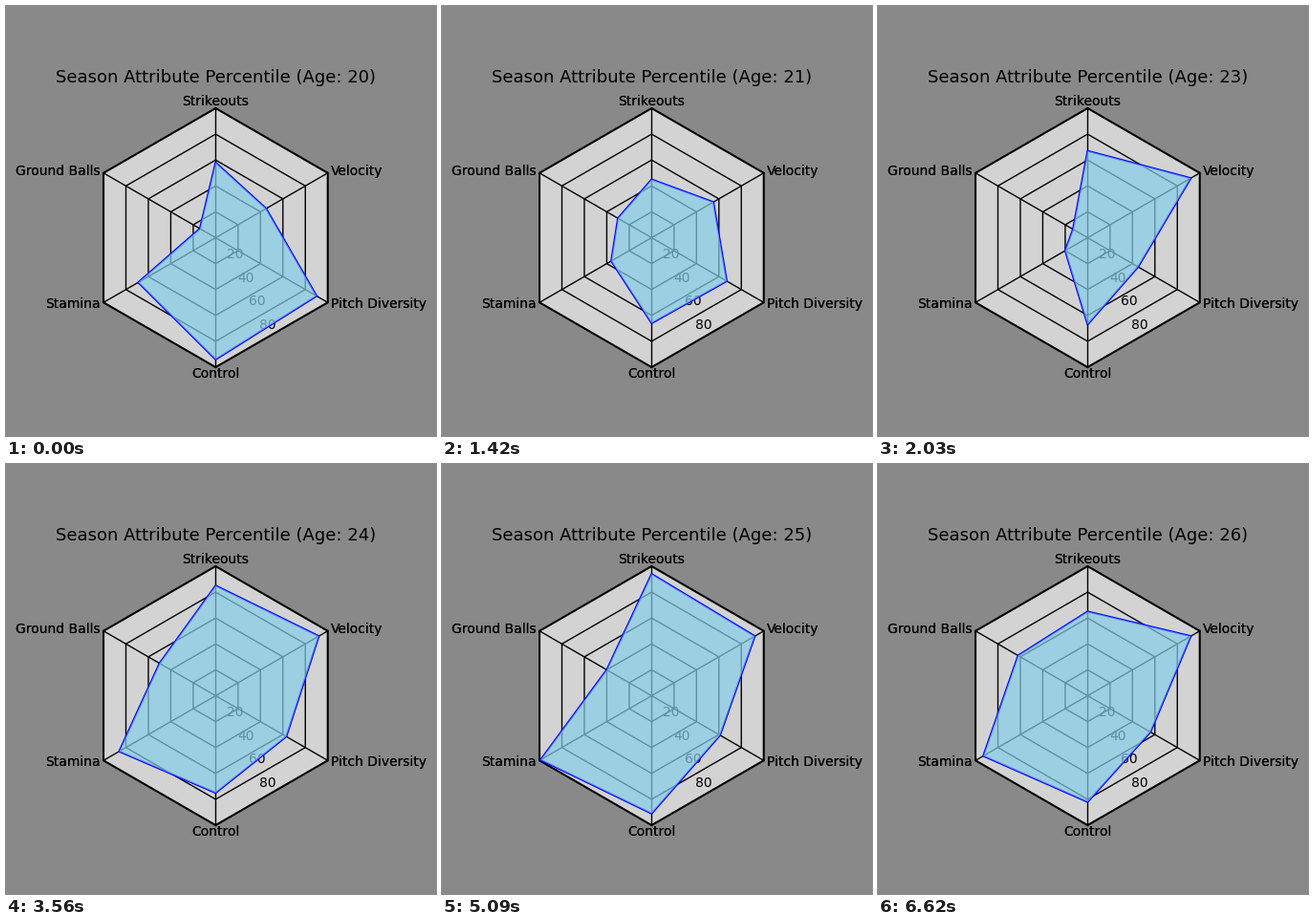
Recreate the animation shown at these times as a matplotlib script. Size 450 by 450 pixels, loop 8000 ms.

```python
import numpy as np
import matplotlib.pyplot as plt
from matplotlib.animation import FuncAnimation

SIZE, DPI = 450, 100
CX, CY, R = 219.375, 242.5, 135.5
LOOP, STEP = 8000, 20
FIRST, HOLD = 500, 1530  # ms: length of the first season, then of each other

AGES = [20, 21, 23, 24, 25, 26]
# percentile per season, clockwise from the top
SCORES = {
    "Strikeouts": [58, 45, 67, 85, 94, 65],
    "Velocity": [45, 55, 92, 92, 92, 92],
    "Pitch Diversity": [90, 67, 45, 63, 61, 56],
    "Control": [94, 66, 67, 75, 91, 82],
    "Stamina": [69, 36, 20, 86, 99, 93],
    "Ground Balls": [14, 30, 13, 50, 40, 62],
}
ANGLES = np.radians(np.arange(0, 360, 60))


def polar(value, angle):
    """Stage position of a percentile; angle is clockwise from the top."""
    r = np.asarray(value) * R / 100
    return np.column_stack([CX + r * np.sin(angle), CY - r * np.cos(angle)])


plt.rcParams["font.family"] = "DejaVu Sans"
fig = plt.figure(figsize=(SIZE / DPI, SIZE / DPI), dpi=DPI, facecolor="#898989")
ax = fig.add_axes([0, 0, 1, 1])
ax.set(xlim=(0, SIZE), ylim=(SIZE, 0))
ax.axis("off")


def hexagon(level, **style):
    patch = plt.Polygon(polar(np.full(6, level), ANGLES), **style)
    return ax.add_patch(patch)


def axis_label(text, angle):
    """Text just outside a corner, growing away from the centre."""
    side = round(np.sin(angle))
    r = R + 2.6 + 4.4 * np.cos(angle) ** 2
    x, y = CX + r * np.sin(angle), CY + 4 - r * np.cos(angle)
    align = {-1: "right", 0: "center", 1: "left"}[side]
    for _ in range(2):  # overprinting darkens the soft glyph edges
        ax.text(x, y, text, fontsize=10, ha=align, va="baseline")


hexagon(100, fc="lightgray", ec="none", zorder=0)
for level in range(20, 100, 20):
    hexagon(level, fill=False, ec="black", lw=1, zorder=1)
    x, y = polar(level, np.radians(155))[0]
    ax.text(x, y, str(level), fontsize=10, ha="left", va="bottom", zorder=2)
for name, angle in zip(SCORES, ANGLES):
    ax.plot(*polar([0, 100], angle).T, color="black", lw=1, zorder=1)
    axis_label(name, angle)
hexagon(100, fill=False, ec="black", lw=1.5, zorder=2)

title = ax.text(CX, 80, "", fontsize=13, ha="center", va="baseline")
edge = hexagon(0, fill=False, ec="blue", lw=1.5, joinstyle="round", zorder=3)
area = hexagon(0, fc="skyblue", ec="none", alpha=0.7, zorder=4)


def update(frame):
    time = (frame + 0.5) * STEP
    season = max(0, int((time - FIRST) // HOLD) + 1)
    points = polar([row[season] for row in SCORES.values()], ANGLES)
    edge.set_xy(points)
    area.set_xy(points)
    title.set_text(f"Season Attribute Percentile (Age: {AGES[season]})")
    return edge, area, title


anim = FuncAnimation(fig, update, frames=LOOP // STEP, interval=STEP,
                     repeat=True, repeat_delay=0)
plt.show()
```
